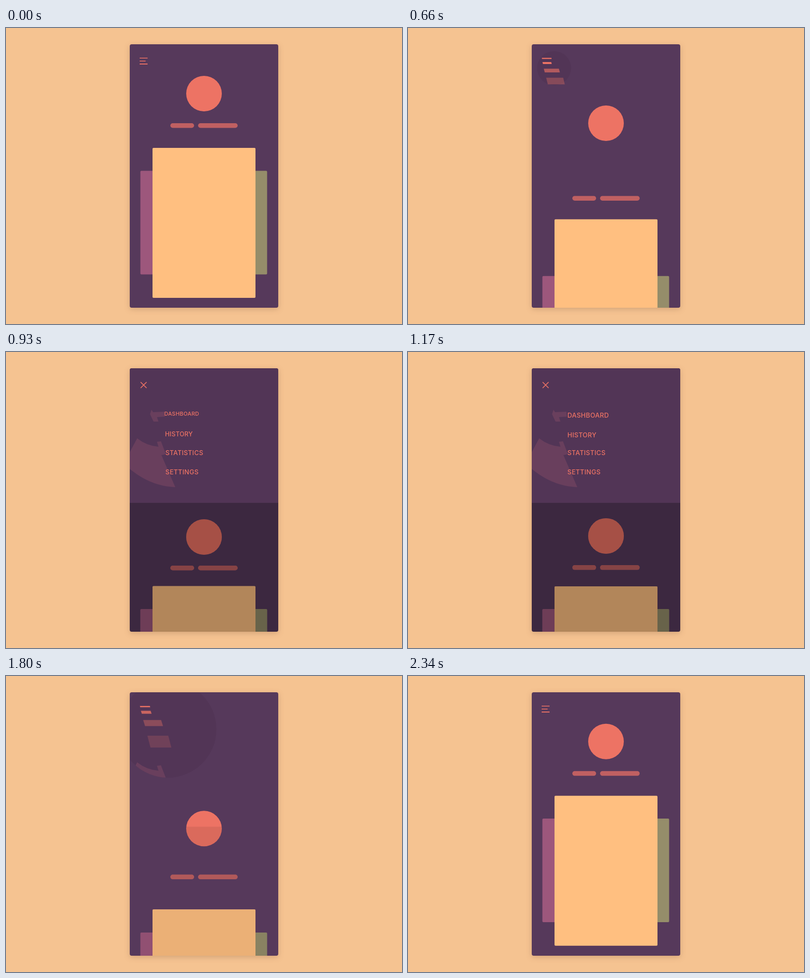
These frames come from a looping animation (800 px wide and 600 px high, 2.37 s). An HTML page:

```html
<!DOCTYPE html>
<html lang="en">
<head>
<meta charset="utf-8">
<title>Menu transition</title>
<style>
  html, body { margin: 0; width: 100%; height: 100%; overflow: hidden; background: #f5c391; }
  svg { display: block; width: 800px; height: 600px; }
  .panel { filter: drop-shadow(0 3px 6px rgba(90, 50, 30, .22)); }
  text { font: 500 13px Inter, Lato, sans-serif; letter-spacing: .3px; fill: #ed7364; }
</style>
</head>
<body>
<svg viewBox="0 0 800 600">
  <defs>
    <clipPath id="panelClip"><rect x="250" y="33" width="300" height="534" rx="4"/></clipPath>
    <clipPath id="diskClip"><circle class="disk"/></clipPath>
    <clipPath id="itemClip">
      <use href="#left"/><use href="#right"/><use href="#card"/>
      <use href="#bar1"/><use href="#bar2"/><use href="#avatar"/>
    </clipPath>
  </defs>
  <rect width="800" height="600" fill="#f5c391"/>
  <rect class="panel" x="250" y="33" width="300" height="534" rx="4" fill="#56395b"/>
  <g clip-path="url(#panelClip)">
    <rect id="backShade" x="250" y="305.5" width="300" height="262"/>
    <rect id="left" x="271.5" y="289.5" width="130" height="210" rx="2" fill="#9d577c"/>
    <rect id="right" x="397.5" y="289.5" width="130" height="210" rx="2" fill="#958d6a"/>
    <rect id="card" x="296" y="243" width="208" height="304" rx="2" fill="#ffbf80"/>
    <rect id="bar1" x="332" y="193" width="48" height="9.5" rx="4.75" fill="#c06062"/>
    <rect id="bar2" x="388" y="193" width="80" height="9.5" rx="4.75" fill="#c06062"/>
    <circle id="avatar" cx="400" cy="133" r="36" fill="#ed7364"/>
    <g clip-path="url(#itemClip)">
      <rect id="itemShade" x="250" y="305.5" width="300" height="262"/>
    </g>
    <g clip-path="url(#diskClip)">
      <rect x="250" y="33" width="300" height="272.5" fill="#523556"/>
      <g id="trails" fill="#693f5d">
        <path id="smallTrail" d="M294 117L297 122L320 121L321 131L305 132L308 141H298L291 126Z"/>
        <path d="M265 175Q284 190 308 192L305 182L313 181L323 207L314 209L342 274Q292 272 250 237V203Z"/>
      </g>
    </g>
    <g id="rows"></g>
    <path id="cross" d="M-6-6L6 6M6-6L-6 6" stroke="#ed7364" stroke-width="1.7"/>
  </g>
</svg>
<script>
const LOOP = 2370;
const SHUTTER = 16;
const $ = id => document.getElementById(id);
const set = (el, attrs) => { for (const k in attrs) el.setAttribute(k, attrs[k]); };
const clamp = v => Math.min(1, Math.max(0, v));
const lerp = (a, b, q) => a + (b - a) * q;
const ramp = (t, start, length) => clamp((t - start) / length);
const ease = p => p < .5 ? 4 * p ** 3 : 1 - 4 * (1 - p) ** 3;
const glide = (t, [start, length]) => ease(ramp(t, start, length));

// A small push past the end that dies away
const settle = (t, [start, length, push]) => {
  const u = Math.max(0, t - start - length) / 70;
  return push * u * Math.exp(1 - u);
};

// open / close: start, duration, overshoot in pixels
const parts = [
  { ids: ['left', 'right'], shift: 231.5, open: [420, 330, 0], close: [1767, 328, -2] },
  { ids: ['card'], shift: 232, open: [481, 330, -.5], close: [1760, 312, -1.5] },
  { ids: ['bar1', 'bar2'], shift: 239, open: [482, 330, 1.2], close: [1692, 348, -.8] },
  { ids: ['avatar'], shift: 239.5, open: [526, 340, 2.5], close: [1639, 401, -2] }
];

const rows = [
  { label: 'DASHBOARD', from: 61, to: 128, dash: 16, width: 82 },
  { label: 'HISTORY', from: 67, to: 168, dash: 12, width: 59 },
  { label: 'STATISTICS', from: 73, to: 204.5, dash: 16, width: 81 },
  { label: 'SETTINGS', from: 73, to: 243, dash: 16, width: 68 }
];

const add = (name, attrs) => {
  const el = document.createElementNS('http://www.w3.org/2000/svg', name);
  set(el, attrs);
  return $('rows').appendChild(el);
};

rows.forEach((row, i) => {
  row.band = add('polygon', { fill: '#ed7364' });
  row.text = add('text', { y: 4.7, x: -1 });
  row.text.textContent = row.label;
  row.open = [603 - 33 * i, 425];
  row.close = [1530 + 31 * i, 320];
});

const travel = (t, part) => glide(t, part.open) - glide(t, part.close);

function drawRow(t, row) {
  const q = travel(t, row);
  const ends = [travel(t - SHUTTER / 2, row), travel(t + SHUTTER / 2, row)];
  const q0 = Math.min(...ends), q1 = Math.max(...ends);
  const x = v => lerp(270, 323, v), y = v => lerp(row.from, row.to, v);
  const half = lerp(1.6, 8, q) / 2;
  const width = lerp(row.dash, row.width, q ** .65);
  const top = y(q0) - half, bottom = y(q1) + half;
  const reveal = ramp(q, .55, .3);
  set(row.band, {
    points: [x(q0), top, x(q0) + width, top, x(q1) + width, bottom, x(q1), bottom].join(' '),
    opacity: Math.min(1, 4.5 / (bottom - top)) * (1 - reveal)
  });
  const scale = Math.max(.3, 1 - 3.3 * (1 - q));
  set(row.text, {
    transform: `translate(${x(q)} ${y(q)}) scale(${scale})`,
    opacity: reveal
  });
}

function draw(t) {
  for (const part of parts) {
    const dy = part.shift * travel(t, part) + settle(t, part.open) + settle(t, part.close);
    part.ids.forEach(id => set($(id), { transform: `translate(0 ${dy})` }));
  }

  const shade = .3 * (ramp(t, 675, 240) - ramp(t, 1530, 368));
  set($('itemShade'), { opacity: shade });
  set($('backShade'), { opacity: shade < .1 ? 0 : shade });

  const q = travel(t, { open: [530, 400], close: [1560, 450] });
  set(document.querySelector('.disk'), {
    cx: lerp(278, 400, q), cy: lerp(67, 169, q), r: 245 * q
  });
  set($('trails'), { opacity: t > 780 ? 1 : 0 });
  set($('smallTrail'), { opacity: t < 1700 ? 1 : 0 });

  rows.forEach(row => drawRow(t, row));

  const cross = travel(t, { open: [750, 160], close: [1530, 160] });
  set($('cross'), {
    transform: `translate(278 67) rotate(${90 * (cross - 1)}) scale(${cross})`,
    opacity: cross
  });
}

const begin = performance.now();
function tick() {
  draw((performance.now() - begin) % LOOP);
  requestAnimationFrame(tick);
}
tick();
</script>
</body>
</html>
```
